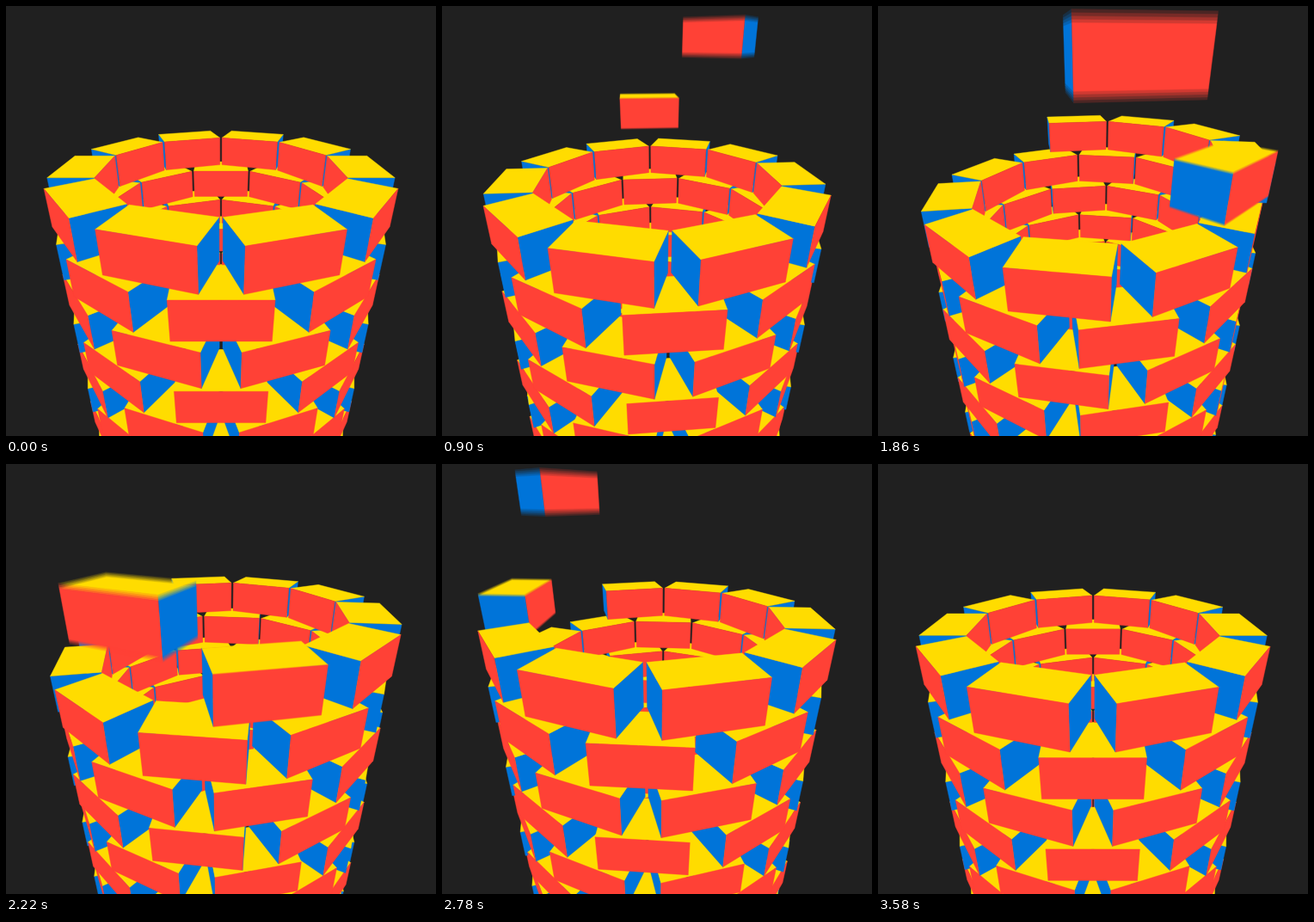
Recreate the animation shown at these times as an HTML page with a canvas. Size 500 by 500 pixels, loop 3600 ms.

```html
<!DOCTYPE html>
<html lang="en">
<head>
<meta charset="utf-8">
<title>Brick tower</title>
<style>
  html, body { margin: 0; width: 100%; height: 100%; overflow: hidden; background: #202020; }
  canvas { display: block; width: 500px; height: 500px; }
</style>
</head>
<body>
<canvas id="stage" width="500" height="500"></canvas>
<script>
const SIZE = 500, FRAMES = 180, FRAME_MS = 20;
const SAMPLES = 5, SHUTTER = 0.6;
const BG = '#202020', RED = '#ff4136', BLUE = '#0074d9', YELLOW = '#ffdc00';

// Brick half sizes: tangent, up, radial
const HALF = [50, 25, 30];
const COLORS = [BLUE, YELLOW, RED];
const RADIUS = 190, ROW = 60, ROWS = 8, PER_ROW = 10;
const STEP = 2 * Math.PI / PER_ROW;

// Camera: focal length, tilt, and the offset of the tower's top centre
const FOCAL = SIZE / 2 / Math.tan(Math.PI / 6);
const SIN = Math.sin(Math.PI / 7), COS = Math.cos(Math.PI / 7);
const LIFT = -76.5, DIST = 516;
const EYE = { u: LIFT * COS + DIST * SIN, v: DIST * COS - LIFT * SIN };

const stage = document.getElementById('stage').getContext('2d');
const buffer = document.createElement('canvas');
buffer.width = buffer.height = SIZE;
const ctx = buffer.getContext('2d');
ctx.lineWidth = 0.4;
ctx.lineJoin = 'round';

function project(x, u, v) {
  const k = FOCAL / (DIST - v * COS - u * SIN);
  return [SIZE / 2 + x * k, SIZE / 2 + (LIFT - u * COS + v * SIN) * k];
}

function drawBrick({ angle, top }) {
  const s = Math.sin(angle), c = Math.cos(angle);
  const mid = top - HALF[1];
  const corner = p => {
    const r = RADIUS + p[2];
    return project(r * s + p[0] * c, mid + p[1], r * c - p[0] * s);
  };
  const eye = [-EYE.v * s, EYE.u - mid, EYE.v * c - RADIUS];

  for (let axis = 0; axis < 3; axis++) {
    if (Math.abs(eye[axis]) <= HALF[axis]) continue;
    const a = (axis + 1) % 3, b = (axis + 2) % 3;
    ctx.beginPath();
    for (const [i, j] of [[-1, -1], [1, -1], [1, 1], [-1, 1]]) {
      const p = [];
      p[axis] = Math.sign(eye[axis]) * HALF[axis];
      p[a] = i * HALF[a];
      p[b] = j * HALF[b];
      ctx.lineTo(...corner(p));
    }
    ctx.closePath();
    ctx.fillStyle = ctx.strokeStyle = COLORS[axis];
    ctx.fill();
    ctx.stroke();
  }
}

// Height above the resting place; each brick lands with a cubic ease-out
function dropHeight(t, k) {
  const left = Math.max(0, 1 - 3 * (t - k / 15));
  return 1588 * left ** 3;
}

function drawScene(t) {
  ctx.fillStyle = BG;
  ctx.fillRect(0, 0, SIZE, SIZE);
  const turn = t * STEP / 2;

  for (let row = ROWS - 1; row >= -1; row--) {
    const bricks = [];
    for (let k = 0; k < PER_ROW; k++) {
      const drop = row < 0 ? dropHeight(t, k) : 0;
      if (drop > 400) continue;
      bricks.push({
        angle: Math.PI + turn + (row + 1) * STEP / 2 - k * STEP,
        top: -ROW * (row + t) + drop
      });
    }
    bricks.sort((a, b) => Math.cos(a.angle) - Math.cos(b.angle));
    bricks.forEach(drawBrick);
  }
}

let shown = -1;
function render(now) {
  const frame = Math.floor(now / FRAME_MS) % FRAMES;
  if (frame !== shown) {
    shown = frame;
    // Average several moments for motion blur
    for (let s = 0; s < SAMPLES; s++) {
      drawScene((frame + SHUTTER * s / SAMPLES) / FRAMES);
      stage.globalAlpha = 1 / (s + 1);
      stage.drawImage(buffer, 0, 0);
    }
  }
}

const start = performance.now();
function tick() {
  render(performance.now() - start);
  requestAnimationFrame(tick);
}
tick();
</script>
</body>
</html>
```
